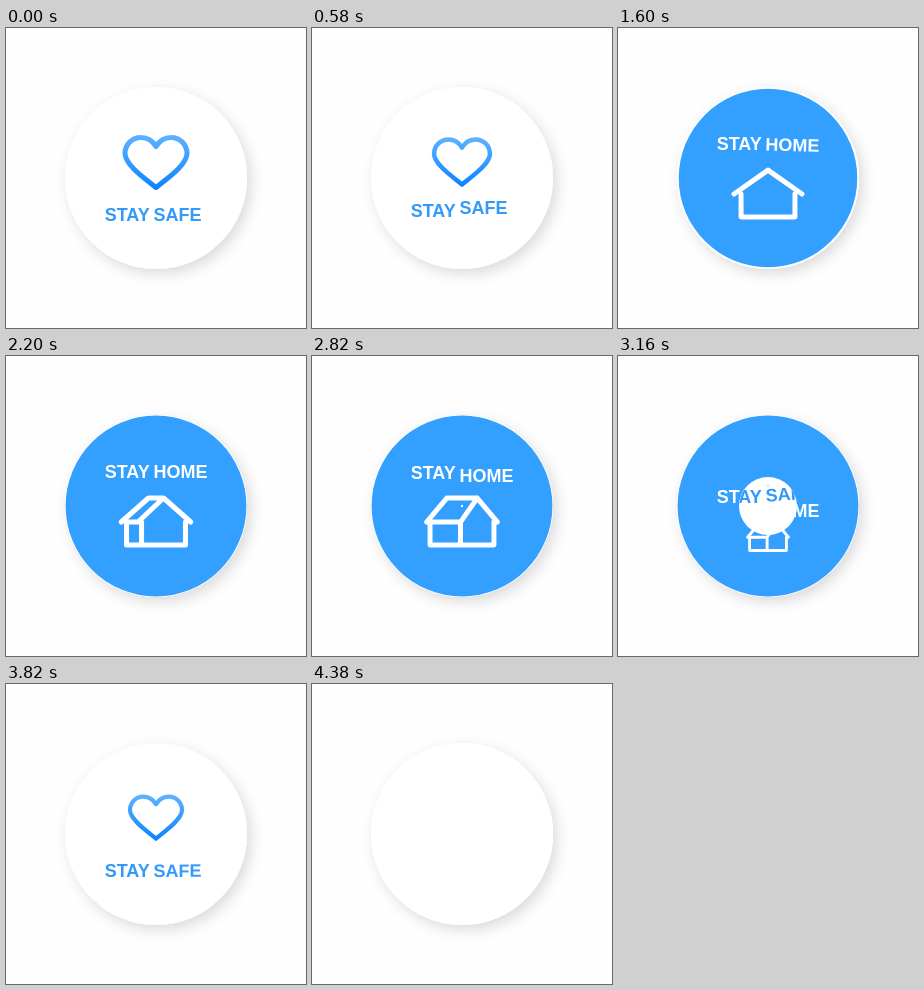
An HTML page for the animation above (4.4 s loop, 300x300 px).

```html
<!DOCTYPE html>
<html lang="en">
<head>
<meta charset="utf-8">
<title>Stay safe, stay home</title>
<style>
  html, body { margin: 0; width: 100%; height: 100%; overflow: hidden; background: #fefefe; }
  svg { display: block; width: 100vw; height: 100vh; }
  text { font: bold 18px "Liberation Sans", Arial, sans-serif; }
  .line { fill: none; stroke-width: 5; stroke-linecap: round; stroke-linejoin: round; }
</style>
</head>
<body>
<svg viewBox="0 0 300 300">
  <defs>
    <filter id="shadow" x="-30%" y="-30%" width="160%" height="160%">
      <feDropShadow dx="4" dy="5" stdDeviation="7" flood-color="#000" flood-opacity=".14"/>
    </filter>
    <linearGradient id="sky" gradientUnits="userSpaceOnUse" x1="0" y1="-27" x2="0" y2="27">
      <stop offset="0" stop-color="#5eb2ff"/>
      <stop offset="1" stop-color="#0a84ff"/>
    </linearGradient>
    <path id="heart" class="line" stroke="url(#sky)" d="M0 25C-8 18-31 3-31-9C-31-18-24-25-15-25C-8-25-3-21 0-16C3-21 8-25 15-25C24-25 31-18 31-9C31 3 8 18 0 25Z"/>
    <clipPath id="blueClip"><circle class="blueR" cx="150" cy="150"/></clipPath>
    <clipPath id="whiteClip"><circle class="whiteR" cx="150" cy="150"/></clipPath>
  </defs>

  <circle cx="150" cy="150" r="91" fill="#fff" filter="url(#shadow)"/>
  <g id="first" fill="#3399fa">
    <use id="heartOut" href="#heart"/>
    <text class="stay">STAY</text>
    <text id="safeOut">SAFE</text>
  </g>

  <circle class="blueR" cx="150" cy="150" fill="#339fff"/>
  <g clip-path="url(#blueClip)" fill="#fff">
    <path id="house" class="line" stroke="#fff"/>
    <text class="stay">STAY</text>
    <text id="home">HOME</text>
  </g>

  <circle class="whiteR" cx="150" cy="150" fill="#fff"/>
  <g id="last" clip-path="url(#whiteClip)" fill="#3399fa">
    <use id="heartIn" href="#heart"/>
    <text class="stay">STAY</text>
    <text id="safeIn">SAFE</text>
  </g>
</svg>
<script>
const LOOP = 4400, BLANK = 4370;
const LOW = 186.5, HIGH = 115.5;
const $ = id => document.getElementById(id);
const all = sel => document.querySelectorAll(sel);

const span = (t, start, len) => Math.min(1, Math.max(0, (t - start) / len));
const sine = u => (1 - Math.cos(Math.PI * u)) / 2;
const cubic = u => u < .5 ? 4 * u ** 3 : 1 - 4 * (1 - u) ** 3;
const mix = (a, b, p) => a + (b - a) * p;
const move = (t, start, len) => sine(span(t, start, len));

function word(el, x, y, tilt = 0) {
  el.setAttribute("x", x);
  el.setAttribute("y", y + 6.5);
  el.setAttribute("transform", `rotate(${tilt} ${x + 25} ${y})`);
}

function place(el, y, sx, sy = sx) {
  el.setAttribute("transform", `translate(150 ${y}) scale(${sx} ${sy})`);
  el.style.display = sy < .01 ? "none" : "";
}

function heart(el, size) {
  place(el, 129.3 + 5.2 * size, size);
}

// Turn 0 shows the front only; 1 shows front and side at equal width.
function housePath(turn) {
  const side = 30.5 * turn, front = 54 - 20.5 * turn;
  const l = -(side + front) / 2, r = -l, m = l + side;
  const top = (m + r) / 2, over = 7 - 3.5 * turn;
  return `M${r + over} 0L${top} -24L${m - 7 * (1 - turn)} 0` +
    `M${top} -24H${top - side}L${l - over} 0` +
    `M${l} 0H${m}M${l} 0V23H${r}V0M${m} 0V23`;
}

function turnAt(t) {
  const q = t < 1600 ? (t - 1600) / 567 : (t - 1600) / 1220;
  return Math.max(-1, Math.min(1, q));
}

function draw(t) {
  const blank = t >= BLANK;
  $("first").style.display = $("last").style.display = blank ? "none" : "";

  const blue = 90.4 * cubic(span(t, 574, 1204));
  const white = 91 * cubic(span(t, 2643, 1204));
  all(".blueR").forEach(c => c.setAttribute("r", t > 3900 ? 0 : blue));
  all(".whiteR").forEach(c => c.setAttribute("r", white));

  const up = move(t, 394, 1185), down = move(t, 2742, 1037);
  const stayY = mix(LOW, HIGH, up - down);
  all(".stay").forEach(el => word(el, 98.7, stayY));

  word($("safeOut"), 147.5, mix(LOW, 108.5, move(t, 428, 800)));

  const rise = span(t, 472, 1226);
  const homeY = mix(LOW, HIGH, sine(rise) - move(t, 2680, 900));
  word($("home"), 147.5, homeY, 6 * Math.sin(Math.PI * rise));

  const fall = span(t, 2747, 1100);
  word($("safeIn"), 147.5, mix(HIGH, LOW, sine(fall)), -4 * Math.sin(Math.PI * fall));

  heart($("heartOut"), 1 - move(t, 367, 1050));
  heart($("heartIn"), move(t, 3010, 1100));

  const turn = turnAt(t);
  const size = move(t, 580, 1050) - move(t, 2800, 800);
  $("house").setAttribute("d", housePath(Math.abs(turn)));
  place($("house"), 166 + 36 * (1 - size), turn < 0 ? -size : size, size);
}

function tick() {
  draw(performance.now() % LOOP);
  requestAnimationFrame(tick);
}
tick();
</script>
</body>
</html>
```
